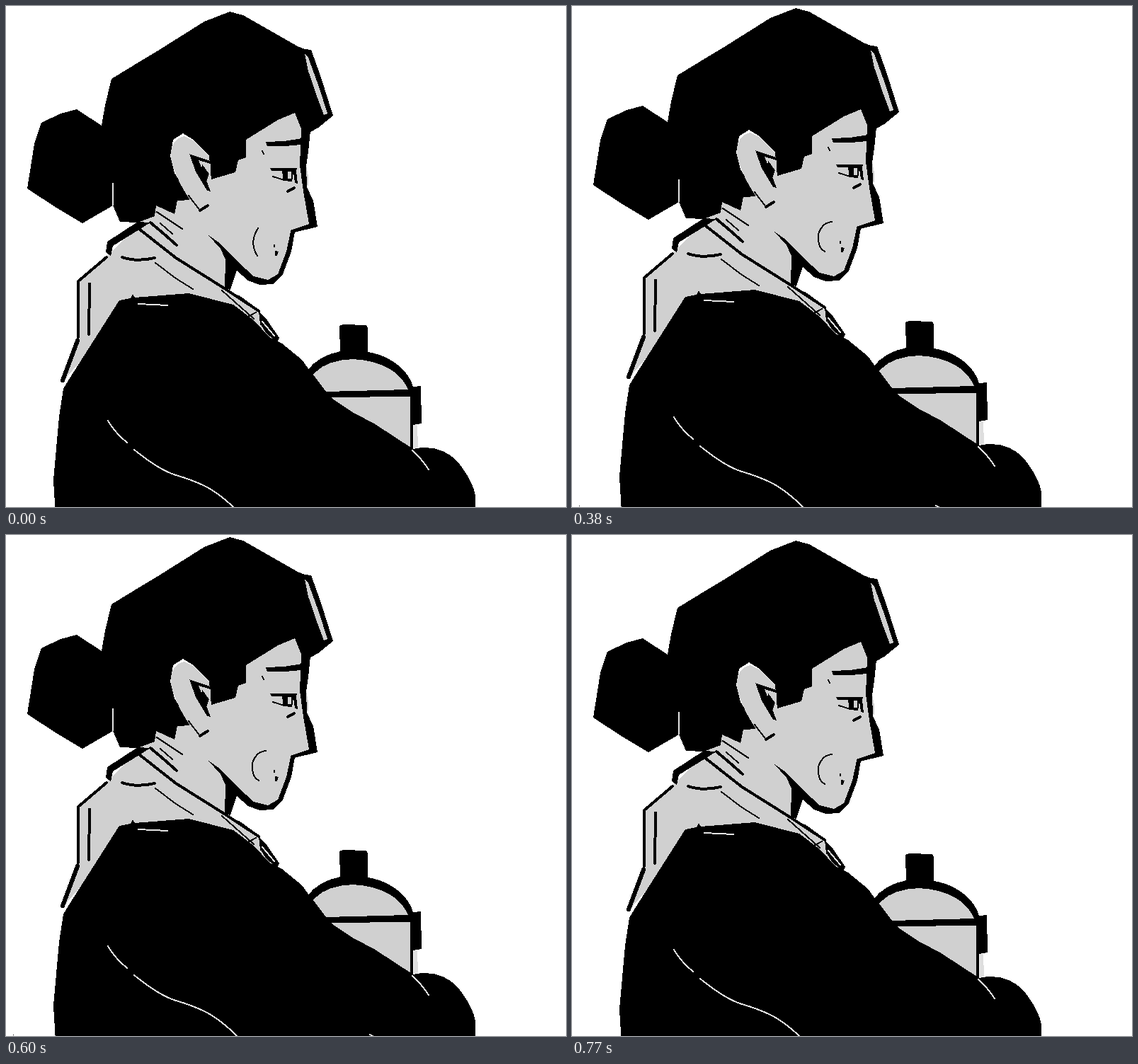
Animation of 791x708 px, one loop 790 ms. Source, as an HTML page:

```html
<!DOCTYPE html>
<html lang="en">
<head>
<meta charset="utf-8">
<title>Holding a flask</title>
<style>
  html, body { margin: 0; width: 100%; height: 100%; overflow: hidden; background: #fff; }
  svg { display: block; width: 791px; height: 708px; }
  .skin { fill: #d0d0d0; }
  .line { fill: none; stroke: #000; stroke-width: 4; stroke-linecap: round; stroke-linejoin: round; }
  .thin { stroke-width: 2; }
  .thick { stroke-width: 6; }
  .light { fill: none; stroke: #e4e4e4; stroke-width: 2; stroke-linecap: round; }
</style>
</head>
<body>
<svg viewBox="0 0 791 708" shape-rendering="crispEdges">
  <g id="figure">
    <g id="flask">
      <path d="M471 452 L476 450 L509 451 L511 455 L511 489 C540 493 568 513 575 538 L586 537 L587 590 L575 592 L575 630 L480 590 L424 517 C436 500 453 492 472 488Z"/>
      <path class="skin" d="M434 521 C446 506 466 500 490 499 C526 501 556 514 568 542 L452 545Z"/>
      <path class="skin" d="M458 553 L571 552 L571 626 L520 592 L494 577Z"/>
      <path fill="#dedede" d="M576 592 L581 592 L582 624 L576 625Z"/>
    </g>

    <g id="skin" class="skin">
      <path d="M410 148 L422 175 L419 250 L435 309 L405 319 L399 350 L386 382 L366 391 L344 382 L324 370 L312 400 L357 430 L386 472 L370 480 L160 440 L80 531 L102 468 L102 390 L146 350 L188 308 L212 280 L240 240 L340 180Z"/>
      <path d="M424 225 L427 240 L427 255 L423 250Z"/>
    </g>

    <g id="hair">
      <path d="M316 8 L335 13 L412 57 L422 61 L431 62 L444 98 L462 155 L441 172 L430 178 L418 176 L408 151 L384 161 L339 189 L339 214 L328 218 L324 235 L290 245 L287 212 L265 189 L250 180 L236 189 L232 212 L238 236 L261 274 L242 275 L238 294 L212 282 L210 297 L186 306 L161 305 L151 282 L108 307 L71 285 L30 258 L40 195 L50 165 L77 152 L100 146 L135 169 L140 140 L149 103 L180 84 L210 66 L280 22Z"/>
      <path class="skin" d="M422 67 L427 73 L443 117 L454 152 L449 154 L440 130 L427 92Z"/>
      <path class="light" d="M151 251 L151 281"/>
    </g>

    <g id="ear">
      <path class="skin" d="M252 184 C238 186 231 200 233 216 C238 240 254 268 272 291 L286 282 L289 235 L287 213 L266 191Z"/>
      <path d="M259 209 L288 219 L289 223 L272 218 L289 262 L284 261 L268 234Z"/>
      <path d="M277 222 L287 236 L283 249 L276 232Z"/>
      <path class="skin" d="M276 222 L289 223 L288 239Z"/>
      <path class="line" d="M274 289 L285 282"/>
      <path class="line thin" d="M258 268 L274 289"/>
    </g>

    <g id="face">
      <path d="M417 174 L430 176 L427 206 L424 226 L425 256 L434 275 L440 312 L403 321 L402 317 L428 308 L420 262 L415 225Z"/>
      <path d="M286 324 L302 335 L328 362 L350 382 L370 387 L384 379 L396 347 L402 319 L408 319 L403 347 L391 379 L377 393 L358 394 L342 388 L326 374 L317 401 L309 399 L310 358 L303 343Z"/>
      <path d="M367 192 L393 191 L418 187 L416 196 L394 198 L369 198Z"/>
      <path d="M373 229 L411 229 L410 233 L412 251 L408 250 L406 235 L404 248 L392 247 L390 233 L375 233Z"/>
      <path class="skin" d="M398 234 L403 234 L403 244 L398 244Z"/>
      <path class="line thin" d="M377 241 L393 246"/>
      <path class="line" stroke-width="3" d="M398 262 L407 257"/>
      <path class="line thin" stroke-width="1" d="M362 205 L364 209 M379 338 L379 340"/>
      <path d="M380 346 L385 347 L383 353 L380 353Z"/>
      <path id="cheekFlat" class="line thin" d="M356 314 Q343 334 355 353"/>
      <path id="cheekRound" class="line thin" d="M367 310 C352 311 346 327 348 337 C349 345 353 350 357 352"/>
    </g>

    <g id="collar">
      <path class="line thin" d="M213 291 L249 315 M218 307 L235 322"/>
      <path class="line" d="M204 306 L223 322 L241 338"/>
      <path class="line" d="M188 315 L240 356 L310 400 L357 431"/>
      <path class="line thin" d="M211 363 L240 385 L264 400"/>
      <path class="line" d="M164 355 Q184 362 210 356"/>
      <path d="M186 305 L204 306 L188 316 L151 339 L148 353 L141 348 L143 333Z"/>
      <path class="line" d="M142 355 L102 389 L102 468"/>
      <path class="line" d="M118 393 L117 464"/>
      <path class="line thick" d="M101 473 L80 529"/>
      <path class="line thin" d="M305 402 L350 442 M329 410 L358 431 L360 450 M340 440 L353 433"/>
      <path d="M358 433 L369 444 L386 469 L383 475 L368 463 L359 449Z"/>
      <path class="light" d="M362 446 L379 466"/>
    </g>

    <g id="coat">
      <path d="M81 541 L90 526 L160 416 L176 413 L179 407 L182 412 L258 406 L321 422 L350 444 L372 468 L390 477 L418 500 L450 544 L468 562 L495 577 L520 590 L575 626 C601 620 623 628 638 644 C651 660 662 680 663 693 L663 720 L70 720 L67 670 L75 580Z"/>
      <path class="light" d="M187 421 L228 423"/>
      <path class="light" d="M144 586 Q153 602 171 617"/>
      <path class="light" d="M181 627 C202 644 220 656 237 662 C258 668 276 675 291 684 Q312 698 326 713"/>
      <path class="light" d="M574 628 Q588 641 597 655"/>
      <path class="light" d="M514 711 L520 714"/>
      <path d="M10 711 h1 v1 h-1z"/>
    </g>
  </g>
</svg>
<script>
  const LOOP = 790;
  const RISE = 380, FALL = 750;
  const part = id => document.getElementById(id);

  // Each step is [time, value]; a value holds until the next step.
  function hold(id, prop, steps) {
    const frames = steps.map(([time, value]) =>
      ({ offset: time / LOOP, [prop]: value, easing: "steps(1, end)" }));
    frames.push({ offset: 1, [prop]: steps[steps.length - 1][1] });
    const motion = part(id).animate(frames, { duration: LOOP, iterations: Infinity });
    motion.startTime = document.timeline.currentTime;
  }

  const low = "translate(0px, 0px)", high = "translate(0px, -5px)";
  hold("figure", "transform", [[0, low], [RISE, high], [FALL, low]]);
  hold("cheekFlat", "opacity", [[0, 1], [RISE, 0]]);
  hold("cheekRound", "opacity", [[0, 0], [RISE, 1]]);
</script>
</body>
</html>
```
